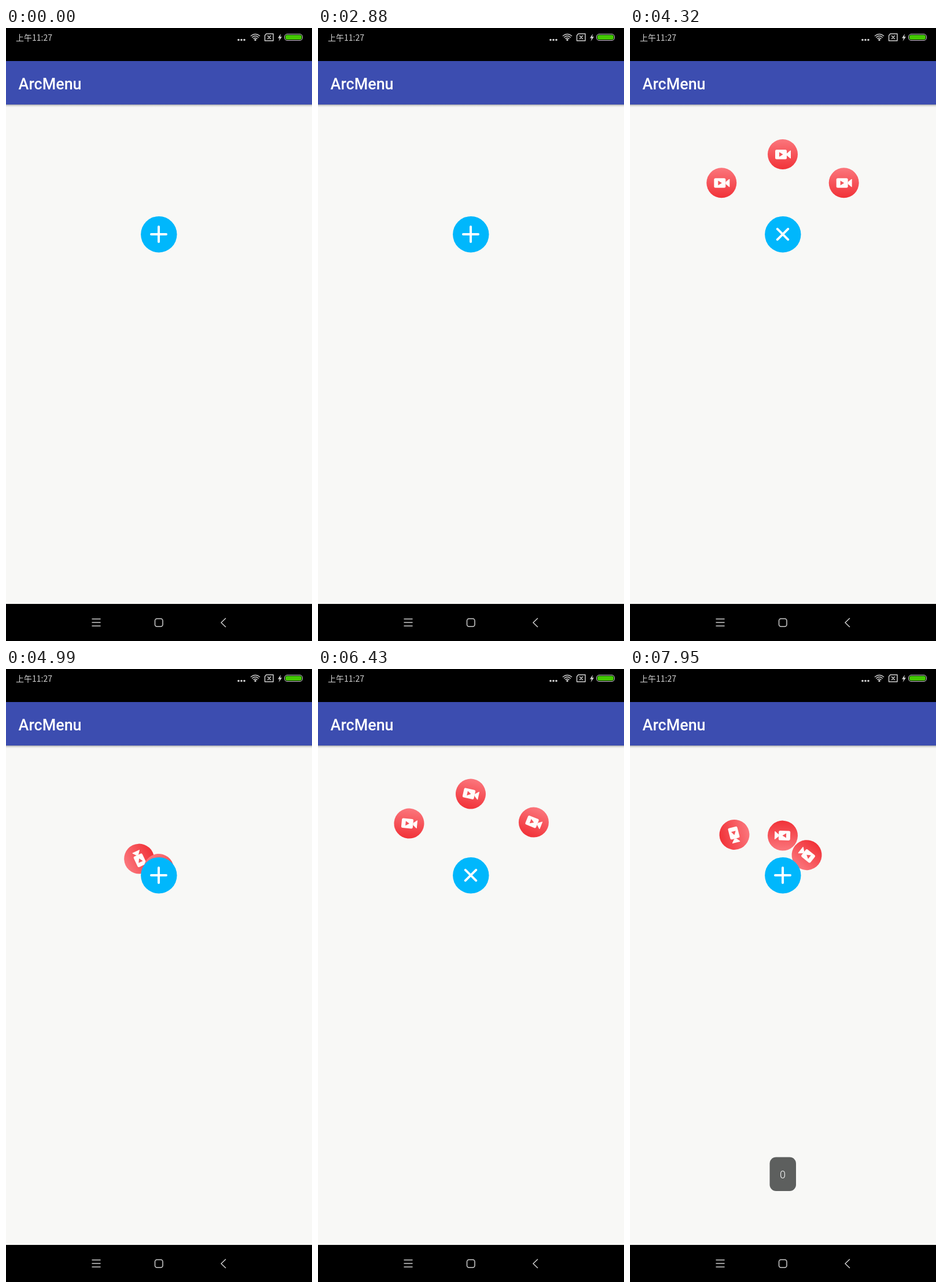
Write an HTML page that moves like this. It is 529 px wide and 1058 px high and loops after 8 s.

```html
<!DOCTYPE html>
<html lang="zh">
<head>
<meta charset="utf-8">
<title>ArcMenu</title>
<style>
  html, body { margin: 0; height: 100%; overflow: hidden; background: #000; }
  svg { display: block; width: 100vw; height: 100vh; }
  .clock { font: 14px "Noto Sans CJK SC", "Noto Sans CJK", sans-serif; fill: #d2d2d2; }
  .title { font: 500 26.9px Roboto, sans-serif; fill: #fff; }
  .toast { font: 300 18px Roboto, sans-serif; fill: #fff; text-anchor: middle; }
  .line { fill: none; stroke: #d0d0d0; stroke-width: 1.5; stroke-linecap: round; stroke-linejoin: round; }
</style>
</head>
<body>
<svg viewBox="0 0 529 1058">
  <defs>
    <linearGradient id="red" x2="0" y2="1">
      <stop stop-color="#fb767c"/><stop offset="1" stop-color="#f13238"/>
    </linearGradient>
    <linearGradient id="shade" x2="0" y2="1">
      <stop stop-color="#9a9ba2"/><stop offset=".4" stop-color="#dcdddb"/><stop offset="1" stop-color="#f8f8f6"/>
    </linearGradient>
    <g id="item">
      <circle r="26" fill="url(#red)"/>
      <rect x="-13" y="-8" width="20" height="16.5" rx="2.5" fill="#fffdfb"/>
      <path d="M7-1.5L13-6.5Q14-7 14-6V6.5Q14 7.5 13 7L7 2Z" fill="#fffdfb"/>
      <path d="M-6-3.8V4.2L0.5.2Z" fill="#f4545a"/>
    </g>
  </defs>

  <rect width="529" height="1058"/>
  <rect y="57" width="529" height="937" fill="#f8f8f6"/>
  <rect y="57" width="529" height="75" fill="#3c4db0"/>
  <rect y="132" width="529" height="5" fill="url(#shade)"/>
  <text class="title" x="21.5" y="105.5">ArcMenu</text>

  <!-- status bar -->
  <text class="clock" x="17" y="22">上午11:27</text>
  <g fill="#d0d0d0">
    <circle cx="402" cy="20.5" r="1.8"/><circle cx="407" cy="20.5" r="1.8"/><circle cx="412" cy="20.5" r="1.8"/>
    <circle cx="431" cy="20.5" r="1.7"/>
    <path d="M475 10L470 17.5H473L471.5 23L477 15H474Z"/>
  </g>
  <path class="line" d="M423.500 13.500Q431 7.500 438.500 13.500M425.700 16Q431 11.700 436.300 16M428 18.400Q431 16 434 18.400"/>
  <path class="line" d="M450 10H462V22H447.500V13ZM452.500 13.500L457.500 18.500M457.500 13.500L452.500 18.500"/>
  <rect class="line" x="481.500" y="10.500" width="31" height="11" rx="4.500" style="stroke-width:1"/>
  <rect x="483" y="12" width="28" height="8" rx="3" fill="#43c800"/>

  <!-- navigation bar -->
  <path class="line" d="M149 1020H163M149 1026H163M149 1032H163M379.500 1019L372 1026.300L379.500 1033.500"/>
  <rect class="line" x="257.500" y="1019.500" width="13.500" height="13.500" rx="3.500"/>

  <g transform="translate(264 356)">
    <g id="items"><use href="#item"/><use href="#item"/><use href="#item"/></g>
    <circle cx=".3" cy=".2" r="31.2" fill="#00b7fc"/>
    <path id="plus" d="M-13 0H13M0-13V13" stroke="#fff" stroke-width="4" stroke-linecap="round"/>
  </g>

  <g id="toast">
    <rect x="241.500" y="842.500" width="45.500" height="58.500" rx="11" fill="#5d5f5e"/>
    <text class="toast" x="264" y="878.500">0</text>
  </g>
</svg>
<script>
const LOOP = 8000, DURATION = 700, RADIUS = 138;
const CYCLES = [{ open: 2955, close: 4332 }, { open: 5785, close: 7402 }];
const ANGLES = [-140, -90, -40];
const OPEN_DELAY = [0, 31, 63];
const CLOSE_DELAY = [93, 23, 0];
const TOAST_AT = 7430;

const items = [...document.getElementById('items').children];
const plus = document.getElementById('plus');
const toast = document.getElementById('toast');

const clamp = x => Math.min(1, Math.max(0, x));
const decelerate = x => 1 - (1 - x) ** 2;
const smooth = x => (1 - Math.cos(Math.PI * x)) / 2;
const overshoot = (x, tension = 1.5) => 1 + (x - 1) ** 2 * ((tension + 1) * (x - 1) + tension);

// Distance (0..1) from the button and rotation in degrees.
function itemPose(t, i, { open, close }) {
  if (t < close) {
    const out = overshoot(clamp((t - open - OPEN_DELAY[i]) / DURATION));
    return { out, spin: 720 * out };
  }
  // Closing: one turn in place, then one more on the way back.
  const phase = 2 * (t - close - CLOSE_DELAY[i]) / DURATION;
  const back = smooth(clamp(phase - 1));
  return { out: 1 - back, spin: 360 * (clamp(phase) + back) };
}

function draw(t) {
  const cycle = t < CYCLES[1].open ? CYCLES[0] : CYCLES[1];
  items.forEach((item, i) => {
    const { out, spin } = itemPose(t, i, cycle);
    const a = ANGLES[i] * Math.PI / 180, r = RADIUS * out;
    item.setAttribute('transform', `translate(${r * Math.cos(a)} ${r * Math.sin(a)}) rotate(${spin})`);
  });

  const turn = start => decelerate(clamp((t - start) / 100));
  plus.setAttribute('transform', `rotate(${45 * (turn(cycle.open) - turn(cycle.close))})`);

  const shown = decelerate(clamp((t - TOAST_AT) / 300));
  toast.setAttribute('opacity', shown);
  toast.setAttribute('transform', `translate(0 ${53 * (1 - shown)})`);
}

const start = performance.now();
function tick() {
  draw((performance.now() - start) % LOOP);
  requestAnimationFrame(tick);
}
tick();
</script>
</body>
</html>
```
